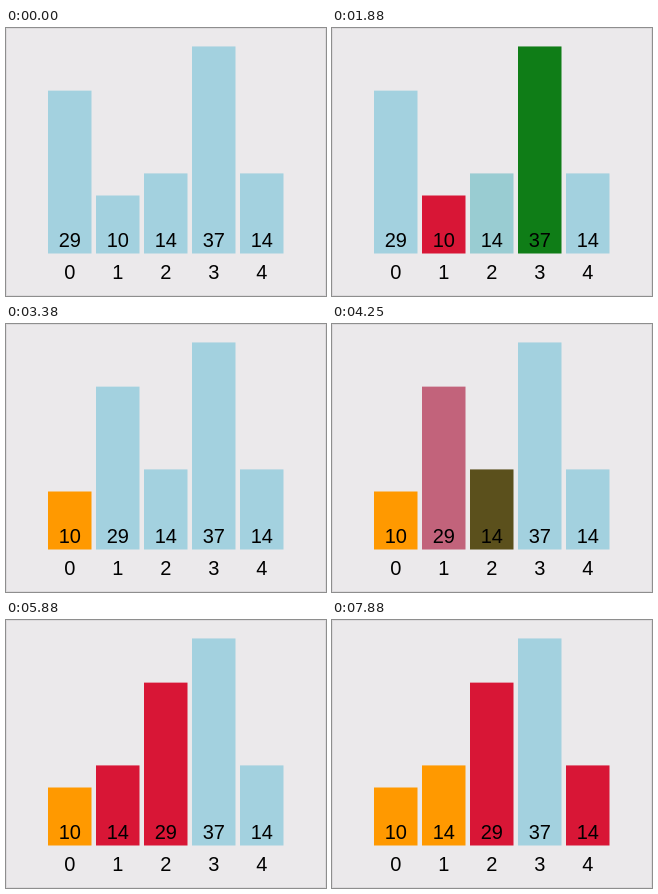
These frames come from a looping animation (320 by 268 pixels, 8000 ms). An HTML page:

```html
<!DOCTYPE html>
<html lang="en">
<head>
<meta charset="utf-8">
<title>Selection sort</title>
<style>
  html, body { margin: 0; width: 100%; height: 100%; overflow: hidden; background: #ebe9eb; }
  svg { display: block; width: 320px; height: 268px; }
  text { font: 20px "Liberation Sans", Arial, sans-serif; text-anchor: middle; fill: #000; }
</style>
</head>
<body>
<svg id="chart" viewBox="0 0 320 268"></svg>
<script>
const LOOP = 8000, TICK = 125;
const START = 276, STEP = 350, FADE = 265;
const LEFT = 42, PITCH = 48, WIDTH = 43.5, BASE = 225.5;

const values = [29, 10, 14, 37, 14];
const colors = {
  b: [163, 209, 223], // untouched
  r: [216, 22, 54],   // current minimum or swapping
  g: [5, 120, 10],    // being checked
  o: [255, 153, 0]    // sorted
};

// One colour letter per bar, in the order of values.
const steps = [
  'bbbbb', 'rbbbb', 'rgbbb', 'brbbb', 'brgbb', 'brbgb', 'brbbg', 'rrbbb',
  'rrbbb', 'bobbb', 'robbb', 'rogbb', 'borbb', 'borgb', 'borbg', 'rorbb',
  'rorbb', 'boobb', 'roobb', 'roogb', 'roobg', 'boobr', 'roobr'
];
const swaps = { 8: [0, 1], 16: [0, 2] };

// Slot of every bar after each step.
const slots = [];
steps.forEach((_, i) => {
  const row = i ? slots[i - 1].slice() : values.map((_, k) => k);
  if (swaps[i]) {
    const [a, b] = swaps[i];
    [row[a], row[b]] = [row[b], row[a]];
  }
  slots.push(row);
});

const chart = document.getElementById('chart');

function add(parent, tag, attrs, label) {
  const el = document.createElementNS('http://www.w3.org/2000/svg', tag);
  for (const key in attrs) el.setAttribute(key, attrs[key]);
  if (label !== undefined) el.textContent = label;
  parent.appendChild(el);
  return el;
}

add(chart, 'rect', { x: 0.5, y: 0.5, width: 319, height: 267, fill: '#ebe9eb', stroke: '#dddbdd' });

values.forEach((_, i) => {
  add(chart, 'text', { x: LEFT + i * PITCH + WIDTH / 2, y: 251 }, i);
});

const bars = values.map(value => {
  const group = add(chart, 'g', {});
  const height = 2.8 + 5.52 * value;
  const rect = add(group, 'rect', { x: 0, y: BASE - height, width: WIDTH, height });
  add(group, 'text', { x: WIDTH / 2, y: 218.5 }, value);
  return { group, rect };
});

const mix = (a, b, p) => a + (b - a) * p;
const ease = p => p < 0.5 ? 4 * p ** 3 : 1 - 4 * (1 - p) ** 3;

function draw(time) {
  const now = Math.floor(time / TICK) * TICK - START;
  const step = Math.max(0, Math.min(steps.length - 1, Math.floor(now / STEP) + 1));
  const prev = Math.max(0, step - 1);
  const p = step ? ease(Math.min(1, (now - prev * STEP) / FADE)) : 1;

  bars.forEach(({ group, rect }, i) => {
    const from = colors[steps[prev][i]], to = colors[steps[step][i]];
    const rgb = from.map((c, k) => Math.round(mix(c, to[k], p)));
    const x = LEFT + PITCH * mix(slots[prev][i], slots[step][i], p);
    rect.setAttribute('fill', `rgb(${rgb})`);
    group.setAttribute('transform', `translate(${x} 0)`);
  });
}

let begin;
function loop(now) {
  begin ??= now;
  draw(Math.max(0, now - begin) % LOOP);
  requestAnimationFrame(loop);
}
draw(0);
requestAnimationFrame(loop);
</script>
</body>
</html>
```
